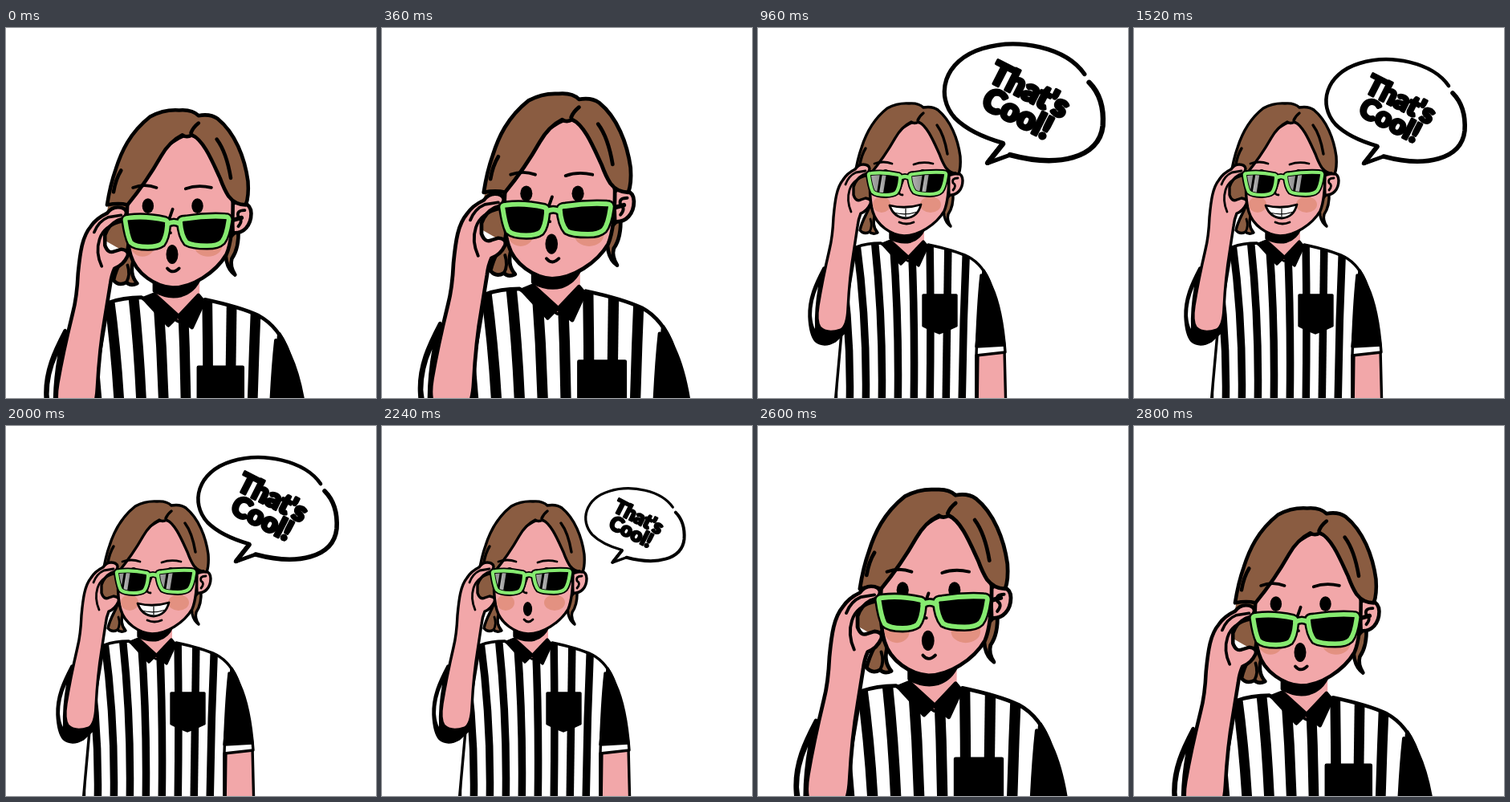
Recreate the animation shown at these times as an HTML page. Size 461 by 461 pixels, loop 3 s.

```html
<!DOCTYPE html>
<html>
<head>
<meta charset="utf-8">
<style>
  html, body { margin: 0; width: 100%; height: 100%; overflow: hidden; background: #fff; }
  svg { display: block; width: 100vw; height: 100vh; }
  .ink { fill: none; stroke: #000; stroke-width: 3.4; stroke-linecap: round; stroke-linejoin: round; }
  .skin { fill: #f2a7a9; }
  .hair { fill: #8a5c41; }
  .black { fill: #000; }
  .white { fill: #fff; }
  .flat { stroke: none; }
  .thin { stroke-width: 2.8; }
  text { font: 900 35px Lato, Inter, sans-serif; letter-spacing: -.5px; text-anchor: middle; fill: #000; stroke: #000; stroke-width: 3; stroke-linejoin: round; }
</style>
</head>
<body>
<svg viewBox="0 0 461 461">
  <defs>
    <path id="lensL" d="M138 184Q137 181 141 181Q157 179 175 183Q178 184 177 188Q176 200 172 205Q168 208 159 208Q147 208 143 204Q140 198 138 184Z"/>
    <path id="lensR" d="M189 185Q189 182 194 182Q213 179 231 180Q235 180 234 184Q232 198 228 203Q224 207 214 207Q200 207 195 204Q190 198 189 185Z"/>
    <clipPath id="clipL"><use href="#lensL"/></clipPath>
    <clipPath id="clipR"><use href="#lensR"/></clipPath>
    <clipPath id="shirt"><path d="M153 268Q136 268 122 273L104 380L95 480H272V400L278 310L290 300Q272 284 250 281L212 270L199 295L187 288L178 295Z"/></clipPath>
    <linearGradient id="fade"><stop stop-color="#c4c4c4"/><stop offset="1" stop-color="#8a8a8a"/></linearGradient>
    <g id="glint" fill="url(#fade)"><path d="M145 175H159L153 212H139Z"/><path d="M162 175H167L161 212H156Z"/></g>
  </defs>

  <g id="figure" class="ink">
    <!-- right arm and shirt -->
    <path class="skin" d="M274 400L273 480H309L307 400Z"/>
    <path class="white" d="M153 268Q136 268 122 273L104 380L95 480H272V408L308 404Q304 350 291 322Q281 295 262 285Q245 277 212 270L187 290Z"/>
    <g id="stripes" clip-path="url(#shirt)" stroke-width="9.5" stroke-linecap="butt"></g>
    <path d="M278 308Q274 345 272 408V480"/>
    <path class="black" d="M281 302Q288 312 293 330Q302 360 307 395L272 397L277 345Z"/>
    <path class="black" d="M206 333H247V371L236 376L226 380L216 376L206 371Z"/>

    <!-- neck and collar -->
    <path class="skin flat" d="M165 248V266L187 289L207 266V248Z"/>
    <path class="black" d="M165 251V262Q178 269 190 266Q202 262 207 250Z"/>
    <path class="black" d="M155 269L165 265L187 285L178 294Z"/>
    <path class="black" d="M206 266L211 272L200 296L187 286Z"/>

    <!-- head -->
    <path class="hair" d="M230 218L232 234Q234 243 240 247Q235 239 237 232Q244 222 243 204Z"/>
    <path class="hair" d="M140 220C136 232 130 238 127 252Q132 258 139 254Q143 258 149 255Q141 246 146 232L143 220Z"/>
    <path class="thin" d="M139 254Q143 247 140 238"/>
    <path class="hair flat" d="M124 170L117 214L138 226L146 176Z"/>
    <path class="skin" d="M237 182C243 176 255 180 255 190C255 201 248 209 238 208Z"/>
    <path class="thin" d="M249 187Q241 187 243 193Q248 196 243 202"/>
    <path class="skin" d="M140 180Q138 212 143 229C148 246 166 258 182 259C200 259 222 245 232 228Q238 214 238 180Q230 125 196 116Q160 130 140 180Z"/>
    <g class="flat" fill="#e39181"><ellipse cx="154" cy="220" rx="11" ry="10"/><ellipse cx="215" cy="220" rx="13" ry="10"/></g>
    <path class="hair" d="M121 182Q124 163 129 149C134 133 142 115 161 100Q174 93 188 94Q200 93 206 99Q217 97 224 102C240 115 249 138 252 160Q253 174 250 182Q240 182 234 174Q230 168 226 157C219 142 211 122 200 117Q195 120 191 117Q179 123 171 137Q158 160 140 182Q132 180 121 182Z"/>
    <path d="M206 106Q201 110 199 115M223 121Q232 133 236 157M134 150Q129 158 127 170"/>
    <path id="brows" class="thin" d="M145 166Q156 162 167 166M194 167Q205 163 218 166"/>
    <g class="black flat"><ellipse cx="159" cy="183" rx="5.4" ry="7"/><ellipse cx="205" cy="183" rx="5.4" ry="7"/></g>
    <path class="thin" d="M182 186L176 203Q175 208 180 208"/>
    <g id="round">
      <ellipse class="black flat" cx="181.5" cy="228" rx="5.6" ry="9"/>
      <path class="thin" d="M177 241Q182 247 188 241"/>
    </g>
    <g id="smile" stroke-width="2.8">
      <path class="white" d="M164 221Q184 226 203 220Q199 236 184 237Q169 236 164 221Z"/>
      <path stroke-width="1.2" d="M184 225V235M169 230Q184 234 199 229"/>
      <path d="M176 242Q185 246 194 242"/>
    </g>

    <!-- raised arm -->
    <path class="black" d="M82 299C72 318 63 337 64 360Q65 382 72 390Q82 398 96 390L109 378Z"/>
    <path class="white flat" d="M75 322Q67 340 67 358Q68 370 71 375Q70 350 75 322Z"/>
    <g id="arm">
      <path class="skin" d="M94 236C96 214 98 199 106 189Q111 181 121 176Q125 170 131 170Q138 170 139 175Q139 181 131 183Q122 188 119 198L119 208Q122 217 128 214L134 212Q142 213 140 219Q136 228 128 231Q125 238 124 247L119 280Q114 310 112 350Q111 372 103 376Q86 382 77 373Q72 365 75 346Q80 315 89 276Q93 260 94 236Z"/>
      <path class="thin" d="M109 195Q113 184 122 180L134 178M116 229Q110 215 114 202Q118 188 136 184"/>
    </g>

    <!-- glasses -->
    <g id="glasses">
      <path stroke-width="4" d="M235 184L246 181"/>
      <g class="black" stroke-width="7.8"><use href="#lensL"/><use href="#lensR"/><path fill="none" d="M177 187Q183 183 189 187"/></g>
      <g class="flat">
        <g clip-path="url(#clipL)"><use class="glint" href="#glint"/></g>
        <g clip-path="url(#clipR)"><g transform="translate(53)"><use class="glint" href="#glint"/></g></g>
      </g>
      <g stroke-width="6"><use href="#lensL"/><use href="#lensR"/></g>
      <g stroke="#86ea70" stroke-width="4.2"><use href="#lensL"/><use href="#lensR"/><path d="M177 187Q183 183 189 187"/></g>
    </g>
  </g>

  <g id="bubble" class="ink" style="stroke-width:4.6">
    <path class="white flat" d="M392 72C372 43 320 32 281 44C238 57 229 96 251 120Q268 137 303 147L286 169L311 160C363 174 408 164 412 128Q414 98 397 81Z"/>
    <path d="M392 72C372 43 320 32 281 44C238 57 229 96 251 120Q268 137 303 147L286 169L311 160"/>
    <path stroke-width="5.6" d="M311 160C363 174 408 164 412 128Q414 98 397 81M303 148L287 168"/>
    <g transform="translate(325.5 102) rotate(27)"><text y="-2.5">That's</text><text y="26.5">Cool!</text></g>
  </g>
</svg>
<script>
const $ = id => document.getElementById(id);
const LOOP = 3000, STEP = 40;

$('stripes').innerHTML = Array.from({ length: 9 }, (_, i) => {
  const k = i - 2;
  return `<path d="M${122 + 23 * k} 262Q${137 + 19.7 * k} 370 ${134 + 20 * k} 480"/>`;
}).join('');

// [time, scale, rise, glasses drop]
const pose = [
  [0, 1.34, -23.5, 13], [560, 1.42, -60, 12], [800, 1, 0, 0],
  [2280, 1, 0, 0], [2520, 1.42, -60, 8], [2800, 1.34, -23.5, 13], [3000, 1.34, -23.5, 13]
];
// [time, shift of the lens reflection]
const shine = [
  [0, 42], [600, 42], [680, 0], [800, -6], [1120, -6],
  [1760, -11], [2280, -11], [2520, -22], [2600, -34], [3000, -34]
];

const clamp = x => Math.min(1, Math.max(0, x));
const smooth = x => x * x * (3 - 2 * x);
const backIn = x => x * x * (3.15 * x - 2.15);

function track(keys, t) {
  const i = keys.findIndex(k => k[0] > t), a = keys[i - 1], b = keys[i];
  const p = smooth((t - a[0]) / (b[0] - a[0]));
  return a.slice(1).map((v, n) => v + (b[n + 1] - v) * p);
}

function draw(t) {
  let [scale, rise, drop] = track(pose, t);
  rise += 14 * Math.sin(Math.PI * clamp((t - 2280) / 240));
  $('figure').setAttribute('transform', `translate(${106.5 * (1 - scale)} ${rise}) scale(${scale})`);
  $('glasses').setAttribute('transform', `translate(0 ${drop})`);
  $('brows').setAttribute('transform', `translate(0 ${3 - drop / 4.3})`);
  const squash = 1 - drop / 190;
  $('arm').setAttribute('transform', `translate(0 ${377 * (1 - squash)}) scale(1 ${squash})`);

  const [shift] = track(shine, t);
  document.querySelectorAll('.glint').forEach(g => g.setAttribute('x', shift));

  const smiling = t >= 840 && t < 2120;
  $('smile').style.display = smiling ? '' : 'none';
  $('round').style.display = smiling ? 'none' : '';

  const size = t < 1500
    ? 1 - backIn(1 - clamp((t - 800) / 320))
    : 1 - backIn(clamp((t - 2000) / 293));
  $('bubble').style.display = size > 0.01 ? '' : 'none';
  $('bubble').setAttribute('transform', `translate(289 173) scale(${size}) translate(-289 -173)`);
}

const start = performance.now();
function tick() {
  const t = (performance.now() - start) % LOOP;
  draw(Math.floor(t / STEP) * STEP);
  requestAnimationFrame(tick);
}
tick();
</script>
</body>
</html>
```
